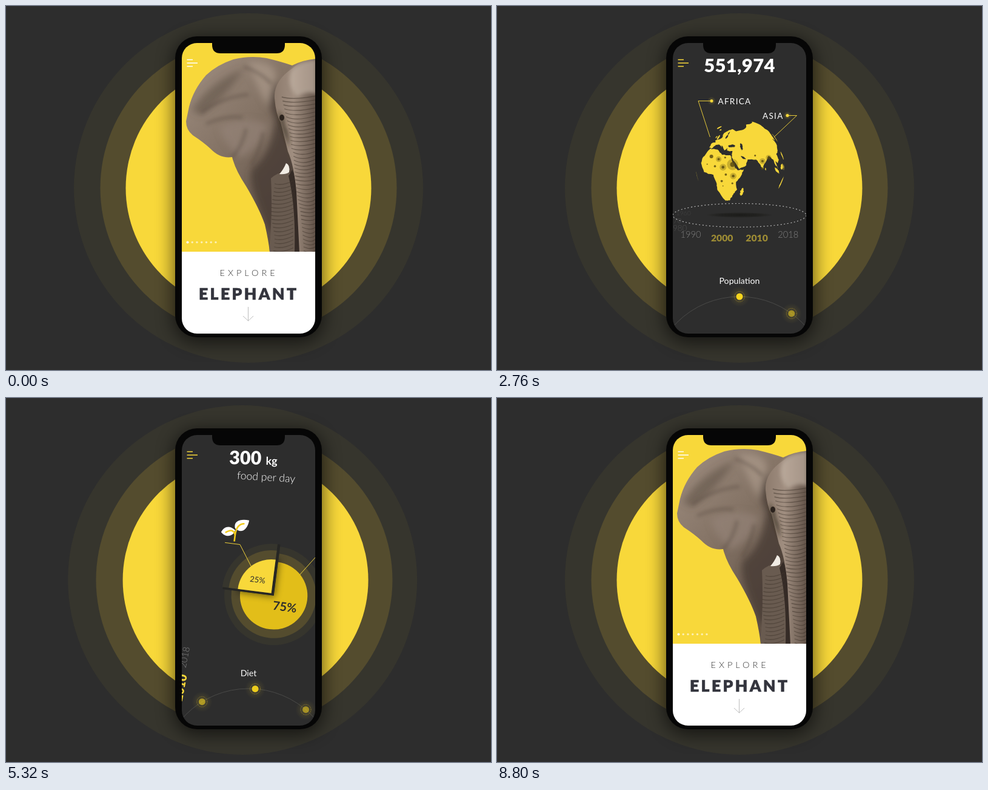
These frames come from a looping animation (800 by 600 pixels, 9.62 s). An HTML page:

```html
<!DOCTYPE html>
<html lang="en">
<head>
<meta charset="utf-8">
<title>Explore elephant</title>
<style>
html, body { margin: 0; width: 100%; height: 100%; overflow: hidden; background: #2d2d2d; }
svg { display: block; width: 100vw; height: 100vh; }
text { font-family: Lato, "Open Sans", sans-serif; }
</style>
</head>
<body>
<svg id="stage" viewBox="0 0 800 600" xmlns="http://www.w3.org/2000/svg">
<defs>
  <clipPath id="screen"><rect x="290" y="61" width="220" height="479" rx="25"/></clipPath>
  <clipPath id="beast"><path d="M512 87Q489 89 472 98Q455 92 430 86Q403 81 375 88Q348 97 330 114Q309 138 302 166L297 190Q297 204 308 213Q325 224 337 235Q353 252 373 249Q378 270 396 297Q418 334 427 360Q433 387 435 405H512Z"/></clipPath>
  <clipPath id="pieClip"><path d="M403 323V242A81 81 0 1 1 322 323Z"/></clipPath>
  <filter id="blur15" x="-30%" y="-30%" width="160%" height="160%"><feGaussianBlur stdDeviation="15"/></filter>
  <filter id="blur6" x="-40%" y="-40%" width="180%" height="180%"><feGaussianBlur stdDeviation="6"/></filter>
  <filter id="blur3" x="-30%" y="-30%" width="160%" height="160%"><feGaussianBlur stdDeviation="3"/></filter>
  <linearGradient id="skin" x1="0" y1="0" x2=".75" y2="1">
    <stop offset="0" stop-color="#a08f82"/><stop offset=".45" stop-color="#847365"/><stop offset="1" stop-color="#5a4c42"/>
  </linearGradient>
  <linearGradient id="trunk">
    <stop offset="0" stop-color="#8d7b6d"/><stop offset=".45" stop-color="#a08e80"/><stop offset="1" stop-color="#5f5046"/>
  </linearGradient>
  <radialGradient id="glow">
    <stop offset="0" stop-color="#f8d83a" stop-opacity=".3"/><stop offset="1" stop-color="#f8d83a" stop-opacity="0"/>
  </radialGradient>
  <radialGradient id="shade">
    <stop offset="0" stop-color="#1b1b19"/><stop offset=".6" stop-color="#222220"/><stop offset="1" stop-color="#2d2d2d"/>
  </radialGradient>
</defs>

<rect width="800" height="600" fill="#2d2d2d"/>
<circle id="ring0" cx="400" cy="300" r="288" fill="#36352d"/>
<circle id="ring1" cx="400" cy="300" r="244.5" fill="#544c2e"/>
<circle id="ring2" cx="400" cy="300" r="202.5" fill="#f8d83a"/>
<rect x="277" y="54" width="246" height="500" rx="38" opacity=".62" filter="url(#blur15)"/>
<rect x="279" y="50" width="242" height="496" rx="36" fill="#060606"/>

<g clip-path="url(#screen)">
  <rect x="290" y="61" width="220" height="479" fill="#2d2d2d"/>

  <g id="world">
    <text id="count" x="400" y="109" font-size="31" font-weight="900" fill="#fff" letter-spacing=".3" text-anchor="middle"></text>
    <path id="land" fill="#f8d83a"/>
    <path id="sea" fill="#2d2d2d"/>
    <g id="spots" fill="#5d4d12"></g>
    <path id="leads" fill="none" stroke="#f8d83a" stroke-width=".9"/>
    <circle cx="354" cy="156.5" r="7" fill="url(#glow)"/><circle cx="354" cy="156.5" r="2.5" fill="#f8d83a"/>
    <circle cx="479" cy="180.5" r="7" fill="url(#glow)"/><circle cx="479" cy="180.5" r="2.5" fill="#f8d83a"/>
    <g font-size="13.5" letter-spacing="1.3" fill="#fff">
      <text x="364.5" y="161.5">AFRICA</text><text x="438" y="185.5">ASIA</text>
    </g>
    <ellipse cx="400" cy="344.5" rx="56" ry="4.5" fill="url(#shade)"/>
    <ellipse cx="400" cy="345" rx="110" ry="19.5" fill="none" stroke="#b4b4b4" stroke-width="1.2" stroke-dasharray="2 3.6"/>
    <g id="years" text-anchor="middle"></g>
  </g>

  <g id="diet">
    <g id="kilos" fill="#fff">
      <text x="359.5" y="109.5" font-size="30.5" font-weight="900">300</text>
      <text x="420" y="109.5" font-size="18" font-weight="700">kg</text>
    </g>
    <text id="perDay" x="400" y="135.5" font-size="17.6" font-weight="300" fill="#fff" text-anchor="middle">food per day</text>
    <g id="pie">
      <path id="bigOuter" fill="#36352d"/><path id="bigMid" fill="#544c2e"/><path id="bigCore" fill="#e2be19"/>
      <g clip-path="url(#pieClip)"><path d="M405 325H342A62 62 0 0 1 405 262Z" opacity=".5" filter="url(#blur6)"/></g>
      <path d="M403 323H318V318H398V238H403Z" fill="#262624"/>
      <path id="smallOuter" fill="#36352d"/><path id="smallMid" fill="#544c2e"/><path id="smallCore" fill="#f8d83a"/>
      <text x="360.5" y="305" font-size="13" fill="#2d2d2d">25%</text>
      <text x="403.5" y="346" font-size="20" font-weight="700" fill="#2d2d2d">75%</text>
      <path d="M312 246.5H337L360 280M490.5 246.5H466.5L441 283.5" fill="none" stroke="#f8d83a" stroke-width=".9"/>
      <path d="M303.5 230C307 221 315 216 326 224C325 235 312 239 303.5 230ZM347 205C346 222 336 229 325.5 221C321 208 334 204 347 205Z" fill="#fff"/>
      <path d="M310.5 230Q323 220 327 232V242.5M340 211.5Q327 213 327 232" fill="none" stroke="#f0ca1b" stroke-width="2.6"/>
      <path id="drops" fill="#fff"/>
      <path d="M466 232.5Q467 238.5 473.5 238.5" fill="none" stroke="#f0ca1b" stroke-width="1.8"/>
    </g>
  </g>

  <g id="dial">
    <circle cx="400" cy="625" r="146" fill="none" stroke="#4a4a48"/>
    <g id="knobs"></g>
  </g>
  <g font-size="14.2" fill="#fff" text-anchor="middle">
    <text id="popLabel" x="400" y="458">Population</text>
    <text id="dietLabel" x="398.8" y="458.5">Diet</text>
  </g>

  <g id="cover">
    <rect x="290" y="61" width="220" height="345" fill="#f8d83a"/>
    <g clip-path="url(#beast)">
      <rect x="290" y="80" width="222" height="326" fill="url(#skin)"/>
      <g filter="url(#blur6)">
        <path d="M446 120Q424 150 444 188Q440 240 406 268Q395 288 432 368L484 406V270Z" fill="#493d35" opacity=".8"/>
        <path d="M400 92Q452 90 444 124L432 165Q410 130 400 92Z" fill="#a99789" opacity=".75"/>
        <path d="M306 172Q340 122 392 104Q372 140 322 180Z" fill="#5d4f45" opacity=".55"/>
        <path d="M352 200Q392 178 432 196Q424 232 386 250Q362 230 352 200Z" fill="#97867a" opacity=".6"/>
      </g>
      <path d="M322 176Q355 150 400 146M330 194Q364 180 390 184M372 250Q390 232 396 202M404 262Q420 238 424 208M438 128Q418 108 392 100" fill="none" stroke="#463a33" stroke-width="4" opacity=".4" filter="url(#blur3)"/>
      <path d="M437 284Q456 266 482 280V406H434Q440 340 437 284Z" fill="#695b50"/>
      <path d="M472 270Q488 300 484 406H476Q478 330 466 280Z" fill="#352b26"/>
      <path d="M512 87Q487 90 472 103Q441 124 443 152Q445 178 453 192L465 240Q475 262 479 306L484 406H512Z" fill="url(#trunk)"/>
      <path d="M512 87Q478 92 470 108Q462 130 480 150Q498 138 512 146Z" fill="#c0b0a2" opacity=".7" filter="url(#blur3)"/>
      <path d="M449 173Q458 180 460 198Q467 208 467 232L455 200Z" fill="#33291f" opacity=".75" filter="url(#blur3)"/>
      <ellipse cx="455" cy="184" rx="4" ry="5" fill="#2b221d"/>
      <path id="folds" fill="none" stroke="#43372f" stroke-width="1.3" opacity=".55"/>
      <path d="M462 259Q469 262 467 274Q461 278 451 277Q458 269 462 259Z" fill="#f1ece4"/>
    </g>
    <g id="pages" fill="#fff"></g>
    <rect x="290" y="405" width="220" height="137" fill="#fff"/>
    <text x="352.5" y="444.5" font-size="14.5" font-weight="300" letter-spacing="5" fill="#333">EXPLORE</text>
    <text x="318" y="483.5" font-size="26.5" font-weight="900" letter-spacing="3.4" fill="#33343d" stroke="#33343d" stroke-width=".6">ELEPHANT</text>
    <path d="M399.5 496V519M391 511L399.5 519L408 511" fill="none" stroke="#bdbdbd"/>
  </g>
  <path id="menu" d="M298.5 88.5H308M298.5 94H316M298.5 99.5H308" fill="none" stroke-width="1.5"/>
</g>
<path d="M340 60H460V64Q460 78 446 78H354Q340 78 340 64Z" fill="#060606"/>
</svg>

<script>
const LOOP = 9620, RAD = Math.PI / 180;
const $ = id => document.getElementById(id);
const set = (id, name, value) => $(id).setAttribute(name, value);
const { sin, cos, abs, min, max, sqrt, atan2, asin, PI } = Math;

const part = (t, a, b) => min(1, max(0, (t - a) / (b - a)));
const ease = (t, a, b) => {
  const u = part(t, a, b);
  return u < .5 ? 4 * u ** 3 : 1 - 4 * (1 - u) ** 3;
};
const bump = (t, a, peak, b, n) => t < peak
  ? sin(part(t, a, peak) * PI / 2) ** 3
  : max(0, cos(part(t, peak, b) * PI / 2)) ** n;

// Globe: coarse coasts as lon, lat pairs; the outline roughens them
const AFRICA = [-6,36, 10,37, 20,31, 33,31, 37,21, 43,11.5, 51,12, 47,4, 40,-4, 40.5,-15, 35,-21, 32,-27, 26,-34,
  19,-35, 12,-17, 13,-8, 9,4, -8,4.5, -17,14.5, -16,21, -10,30];
const EURASIA = [-9,37, -9,43, -1,46, -4,48.5, 8,54, 8,57, 5,59, 5,62, 14,68, 25,71, 41,67, 68,69, 104,77, 140,72,
  178,66, 160,59, 140,54, 140,48, 129,41, 126,35, 121,39, 122,31, 114,22.5, 107,20, 109,12, 105,9, 100.5,13, 103.5,2,
  98.5,9, 97,16, 91,22.5, 80,14, 77.5,8, 73,17, 70,22, 58,24, 55,17, 45,13, 35,28, 36,36.5, 27,37, 26,40.5, 23,37,
  19,41, 13,45.5, 17.5,40, 10,44, 3,43, -2,37];
// Blobs: lon, lat, half width, half height, tilt
const ISLES = [[46.5,-19,2.2,6.5,-15], [-2,54,2.2,4,15], [-8,53.5,1.7,1.7,0], [-19,65,4,1.2,0], [-42,65.5,7,3.5,0],
  [-40,-11,5,8,0], [128,-25,14,9,0], [101,0,1.6,7,40], [114,1,4,4,0], [121,-2,1.5,4,0], [123,13,2,6,15],
  [81,7.5,.9,1.5,0], [137,36,2,7,-40]];
const SEAS = [[34,43.3,6.5,2,0], [51,42,2.4,5,8], [19,57,2.2,3.5,-25], [20,63,1.6,3,-15], [52,27,4.2,1.2,-35],
  [38.5,20.5,1.2,9,25]];
const R = 74, GX = 401.5, GY = 262, TILT = 18 * RAD, ROLL = 4 * RAD, LON0 = 41;

function blob([lon, lat, w, h, tilt]) {
  const c = cos(tilt * RAD), s = sin(tilt * RAD), pts = [];
  for (let a = 0; a < 360; a += 45) {
    const x = w * cos(a * RAD), y = h * sin(a * RAD);
    pts.push(lon + x * c - y * s, lat + x * s + y * c);
  }
  return pts;
}
const LAND = [AFRICA, EURASIA, ...ISLES.map(blob)], SEA = SEAS.map(blob);

function project(lon, lat, mid) {
  const d = (lon - mid) * RAD, f = lat * RAD;
  let x = cos(f) * sin(d);
  let y = -(sin(f) * cos(TILT) - cos(f) * sin(TILT) * cos(d));
  const z = sin(f) * sin(TILT) + cos(f) * cos(TILT) * cos(d);
  if (z < 0) { const h = sqrt(x * x + y * y); x /= h; y /= h; }
  return [GX + R * (x * cos(ROLL) + y * sin(ROLL)), GY + R * (y * cos(ROLL) - x * sin(ROLL)), z];
}
function unproject(px, py) {
  const a = (px - GX) / R, b = (py - GY) / R;
  const x = a * cos(ROLL) - b * sin(ROLL), y = -(a * sin(ROLL) + b * cos(ROLL));
  const z = sqrt(1 - x * x - y * y);
  return [LON0 + atan2(x, z * cos(TILT) - y * sin(TILT)) / RAD,
          asin(y * cos(TILT) + z * sin(TILT)) / RAD];
}
function outline(list, mid) {
  const pts = [], n = list.length;
  let seen = false;
  for (let i = 0; i < n; i += 2) {
    const j = (i + 2) % n;
    for (let s = 0; s < 4; s++) {
      const lon = list[i] + (list[j] - list[i]) * s / 4, lat = list[i + 1] + (list[j + 1] - list[i + 1]) * s / 4;
      const rough = s ? .55 : 0;
      const p = project(lon + rough * sin(7 * lat + lon), lat + rough * sin(5 * lon + 2 * lat), mid);
      seen = seen || p[2] > 0;
      pts.push(p[0].toFixed(1) + " " + p[1].toFixed(1));
    }
  }
  return seen ? "M" + pts.join("L") + "Z" : "";
}

// x, y, radius
const SPOTS = [[359,249,3], [372,253,2], [383,250,1.6], [352,262,1], [366,265,1.8], [380,266,2.4], [396,261,4],
  [385,278,1.9], [397.5,280,2.3], [378,289,1.9], [396,292,1.5], [380,297,.9], [444,254,2.1], [453,248,2],
  [432,245,1.5], [444,266,1.8]].map(([x, y, r]) => ({ at: unproject(x, y), r }));
$("spots").innerHTML = SPOTS.map(({ r }) =>
  `<g><circle r="${r < 2 || r === 3 ? 0 : r * 2.3}" opacity=".3"/><circle r="${r}" opacity=".85"/></g>`).join("");

// Years on the turntable: label and resting opacity
const YEARS = [[1950,.08], [1960,.1], [1970,.14], [1980,.27], [1990,.38], [2000,.17], [2010,.1], [2018,.4]];
$("years").innerHTML = YEARS.map(([y]) => `<text>${y}</text>`).join("");

function drawYears(turn) {
  YEARS.forEach(([, rest], i) => {
    const k = i - 5 - turn, d = abs(k), a = k * 27.3 * RAD, bold = d < .75;
    const nudge = d < 2 ? 5.5 * k * sin(PI * k) ** 2 : 0;
    const size = 12.3 + 3.2 * cos(a) + 3.6 * max(0, 1 - 1.8 * d);
    const alpha = bold ? 1 - .9 * d : d > 2.4 ? min(rest, .15) : rest;
    const el = $("years").children[i];
    el.setAttribute("x", 400 + 110 * sin(a) + nudge);
    el.setAttribute("y", 356 + 27 * cos(a) + size * .36);
    el.setAttribute("font-size", size);
    el.setAttribute("font-weight", bold ? 900 : 300);
    el.setAttribute("fill", bold ? "#f8d83a" : "#fff");
    el.setAttribute("opacity", k < -5.2 ? 0 : alpha);
  });
}

$("knobs").innerHTML = [0, 1, 2].map(() => `<g><circle r="17" fill="url(#glow)" opacity=".55"/>
  <circle r="8.5" fill="none" stroke="#a08a2a" stroke-width=".8" stroke-dasharray="1.5 1.2"/>
  <circle r="5.5" fill="#f7d51d"/></g>`).join("");

$("pages").innerHTML = [0, 1, 2, 3, 4, 5, 6].map(i =>
  `<circle cx="${299.5 + 7.75 * i}" cy="389.5" r="${i ? 1.7 : 2}" opacity="${i ? .6 : 1}"/>`).join("");

let folds = "";
for (let y = 150; y < 405; y += 6.5) {
  const left = y < 240 ? 453 + (y - 150) * .13 : 467 + min(17, (y - 240) * .17);
  folds += `M${left + 4 + 3 * sin(y)} ${y}Q${left + 22} ${y + 7 + 2 * sin(y * 3)} 512 ${y - 2}`;
  if (y > 290) folds += `M${440 + 3 * sin(y * 2)} ${y}Q456 ${y + 4} 474 ${y - 5}`;
}
set("folds", "d", folds);

const drop = (x, top, y, r) =>
  `M${x} ${top}Q${x + r} ${y - r * .7} ${x + r} ${y}A${r} ${r} 0 1 1 ${x - r} ${y}Q${x - r} ${y - r * .7} ${x} ${top}Z`;
set("drops", "d", drop(472.3, 214, 232.5, 9.7) + drop(484.5, 205, 215.5, 5.6) + drop(492.7, 223, 230.2, 4));

const bigSector = r => `M403 323V${323 - r}A${r} ${r} 0 1 1 ${403 - r} 323Z`;
const smallSector = r => `M398.5 319.5H${398.5 - r}A${r} ${r} 0 0 1 398.5 ${319.5 - r}Z`;
for (const [name, r] of [["Outer", 81.5], ["Core", 55.7]]) {
  set("big" + name, "d", bigSector(r));
  set("small" + name, "d", smallSector(r));
}

const move = (x, y) => `translate(${x} ${y})`;
const turnBy = deg => `rotate(${deg} 400 625)`;
const show = (id, on) => set(id, "display", on ? "inline" : "none");

function draw(t) {
  const open = ease(t, 20, 1000), swing = ease(t, 4150, 5850), close = ease(t, 7440, 8620);

  // backdrop rings drift with each page change
  const dx = -30 * bump(t, 4080, 4910, 5800, 5);
  const dy = -20 * bump(t, 20, 520, 1300, 4) + 20 * bump(t, 7440, 7900, 8780, 4);
  [1.4, 1, .7].forEach((f, i) => set("ring" + i, "transform", move(dx * f, dy * f)));

  const lift = close > 0 ? close - 1 : -open;
  set("cover", "transform", move(0, 482 * lift));
  show("cover", lift > -1);
  set("menu", "stroke", lift > -.75 ? "#fff" : "#f8d83a");
  const fall = 480 * close, rise = 480 * (1 - open);

  const worldOn = t > 20 && swing < .999;
  show("world", worldOn);
  if (worldOn) {
    set("world", "transform", `${move(0, rise)} rotate(${-90 * swing} 401 498)`);
    const left = 1 - part(t, 1960, 3728.7);
    $("count").textContent = Math.round(540000 + 40000 * left * left).toLocaleString("en-US");
    const sec = (t - 1100) / 1000, mid = LON0 + 3.7 * sec;
    set("land", "d", LAND.map(l => outline(l, mid)).join(""));
    set("sea", "d", SEA.map(l => outline(l, mid)).join(""));
    SPOTS.forEach((s, i) => {
      const p = project(s.at[0], s.at[1], mid);
      $("spots").children[i].setAttribute("transform", move(p[0], p[1]));
    });
    set("leads", "d", `M354 156.5H332L${355.5 - 2.5 * sec} ${219 - 1.8 * sec}` +
      `M479 180.5H494.5L${461 - 2.4 * sec} ${219 - 1.8 * sec}`);
    drawYears(ease(t, 1900, 3620));
  }

  const dietOn = swing > 0 && close < 1;
  show("diet", dietOn);
  if (dietOn) {
    set("diet", "transform", move(0, fall));
    set("pie", "transform", turnBy(61 * (1 - swing)));
    set("perDay", "transform", turnBy(60 * (1 - ease(t, 4130, 5700))));
    set("kilos", "transform", turnBy(60 * (1 - ease(t, 4100, 5550))));
    const r = 70 - 7 * sin(PI * part(t, 6050, 7010)) ** 2;
    set("bigMid", "d", bigSector(r));
    set("smallMid", "d", smallSector(r + .8));
  }

  const drift = rise + fall;
  set("dial", "transform", move(0, drift + 110 * (1 - ease(t, 150, 1500))));
  [0, 1, 2].forEach(i => {
    const deg = 36 * (i - swing), knob = $("knobs").children[i];
    knob.setAttribute("transform", move(400 + 146 * sin(deg * RAD), 625 - 146 * cos(deg * RAD)));
    knob.lastElementChild.setAttribute("opacity", 1 - .47 * min(1, abs(deg) / 36));
  });

  const swap = ease(t, 4100, 5520);
  set("popLabel", "transform", `${move(0, rise + 40 * (1 - ease(t, 100, 1400)))} ${turnBy(-36 * swap)}`);
  set("popLabel", "opacity", max(0, 1 - 1.5 * swap));
  set("dietLabel", "transform", `${move(0, fall)} ${turnBy(36 * (1 - swap))}`);
  set("dietLabel", "opacity", swap);
}

const start = performance.now();
function tick() {
  draw((performance.now() - start) % LOOP);
  requestAnimationFrame(tick);
}
tick();
</script>
</body>
</html>
```
